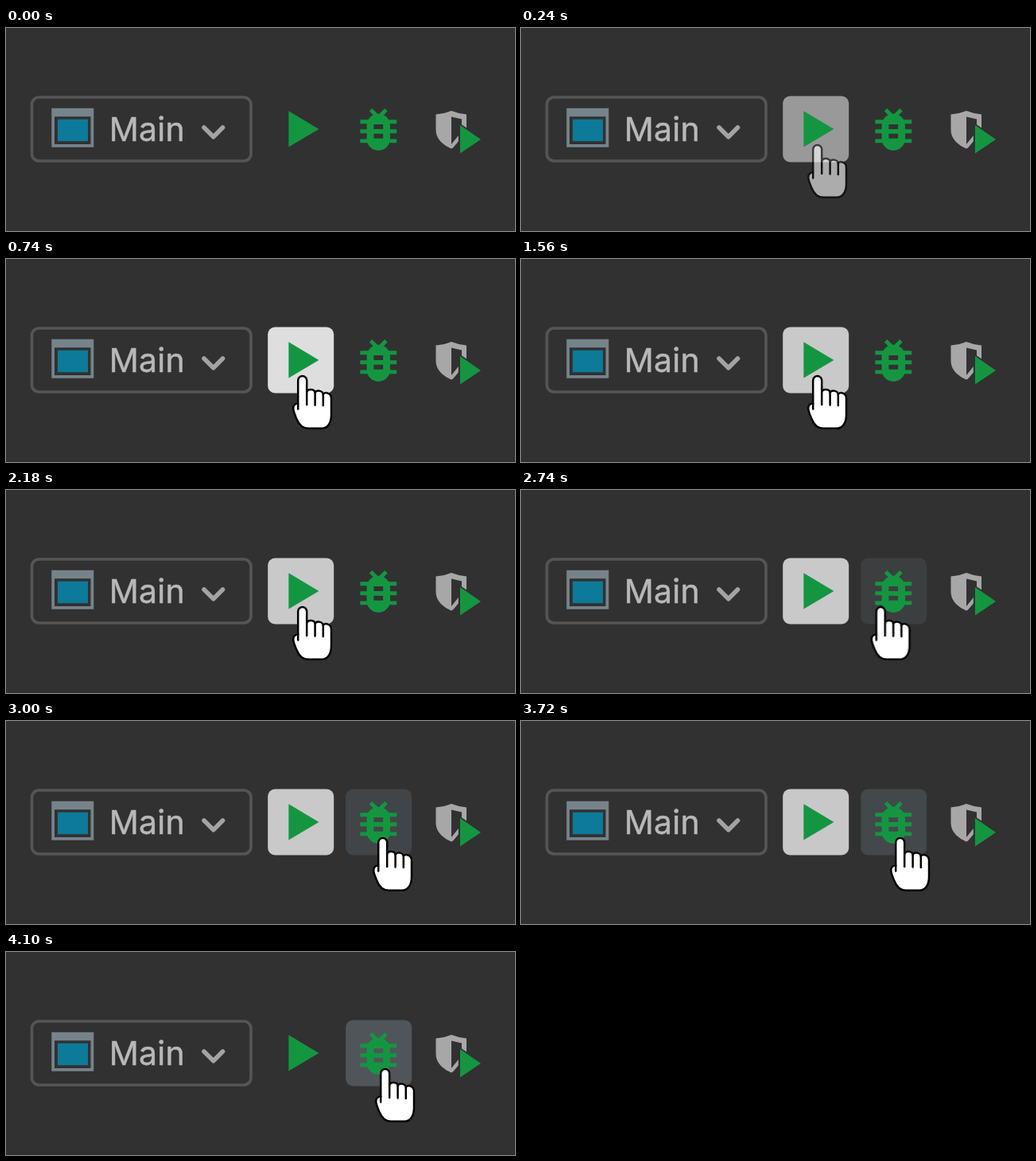
Animation of 640 by 255 pixels, one loop 4680 ms. Source, as an HTML page:

```html
<!DOCTYPE html>
<html lang="en">
<head>
<meta charset="utf-8">
<title>Run toolbar</title>
<style>
  html, body { margin: 0; width: 100%; height: 100%; overflow: hidden; background: #313131; }
  svg { display: block; width: 100vw; height: 100vh; }
  text { font: 400 41px Inter, "Open Sans", sans-serif; letter-spacing: .3px; fill: #b8b8b8; stroke: #b8b8b8; stroke-width: .5; }
  .green { fill: #149641; }
  .legs { fill: none; stroke: #149641; stroke-width: 1.7; }
  .run, .debug, .hand { animation: 4680ms linear infinite; }
  .run { animation-name: run; }
  .debug { animation-name: debug; }
  .hand { animation-name: hand; }

  @keyframes run {
    0%, .43% { opacity: 0; fill: #dedede; animation-timing-function: ease-out; }
    11.54%, 23.5% { opacity: 1; fill: #dedede; animation-timing-function: ease-out; }
    33.33%, 79.49% { opacity: 1; fill: #c9c9c9; }
    87.61%, 100% { opacity: 0; fill: #c9c9c9; }
  }
  @keyframes debug {
    0%, 47.01% { fill: #313131; }
    66.67%, 79.49% { fill: #43484a; }
    87.61%, 100% { fill: #50555a; }
  }
  @keyframes hand {
    0%, .43% { opacity: 0; transform: none; animation-timing-function: ease-out; }
    11.54% { opacity: 1; transform: none; }
    47.44% { opacity: 1; transform: none; animation-timing-function: ease-out; }
    66.67%, 100% { opacity: 1; transform: translateX(104px); }
  }
</style>
</head>
<body>
<svg viewBox="0 0 640 255" preserveAspectRatio="none">
  <rect width="640" height="255" fill="#313131"/>

  <!-- Configuration selector -->
  <rect x="32.5" y="87" width="275.5" height="80" rx="9" fill="none" stroke="#555" stroke-width="3.6"/>
  <path d="M57.3 100.7h53v49h-53zM61 111.3v34.7h45.5v-34.7z" fill="#76838b" fill-rule="evenodd"/>
  <rect x="65" y="114.7" width="38" height="27.5" fill="#0d7a99"/>
  <text x="129.7" y="142.3">Main</text>
  <path d="M249 125l11.8 11.7L272.5 125" fill="none" stroke="#a3a3a3" stroke-width="5.6" stroke-linecap="round" stroke-linejoin="round"/>

  <!-- Run -->
  <rect class="run" x="329.2" y="85.5" width="83" height="83" rx="9"/>
  <path class="green" d="M355.4 104.2l38 22.8-38 22.5z"/>

  <!-- Debug -->
  <rect class="debug" x="427.2" y="85.5" width="83" height="83" rx="9"/>
  <g transform="translate(433 91.6) scale(2.94)">
    <path class="green" fill-rule="evenodd" d="M7 10.500a5 5 0 0 1 10 0v5.700a5 5 0 0 1-10 0zM10 10v2h4v-2zM10 14v2h4v-2z"/>
    <path class="legs" d="M4.200 8.900h15.600M4.200 13h15.600M4.200 17.100h15.600M8.700 3.800l3.300 3.300 3.300-3.300"/>
  </g>

  <!-- Run with coverage -->
  <path fill="#a7a7a7" fill-rule="evenodd" d="M540.500 108.500q11-1 19.500-4.500 8.500 3.500 19 4.500v22l-17 20-2 1c-9-4-19.500-11-19.500-24zM560 111.500v34.500l13-16v-15.500z"/>
  <path fill="#313131" d="M568.800 118.500l31 21-31 21z"/>
  <path class="green" d="M571 122l26 18-26 17.500z"/>

  <!-- Pointer -->
  <g class="hand" stroke="#000" stroke-width="2.5" stroke-linecap="round" stroke-linejoin="round">
    <path fill="#fff" d="M367.200 181.500v-29a5.500 5.500 0 0 1 11 0V167c1-4.500 10-4 10.400 1 1.500-4 9.500-3 10.200 2 2-3.500 10.200-2 10.200 5v21c0 9-4 16.800-12 16.800H380c-8 0-12-5.500-14.500-11.800-2-5-4.300-9.500-4.300-13.500 0-3.500 2.500-6 6-6z"/>
    <path fill="none" d="M367.200 181.500v7M378.200 167v16M388.600 168v15.500M398.800 170v14"/>
  </g>
</svg>
</body>
</html>
```
